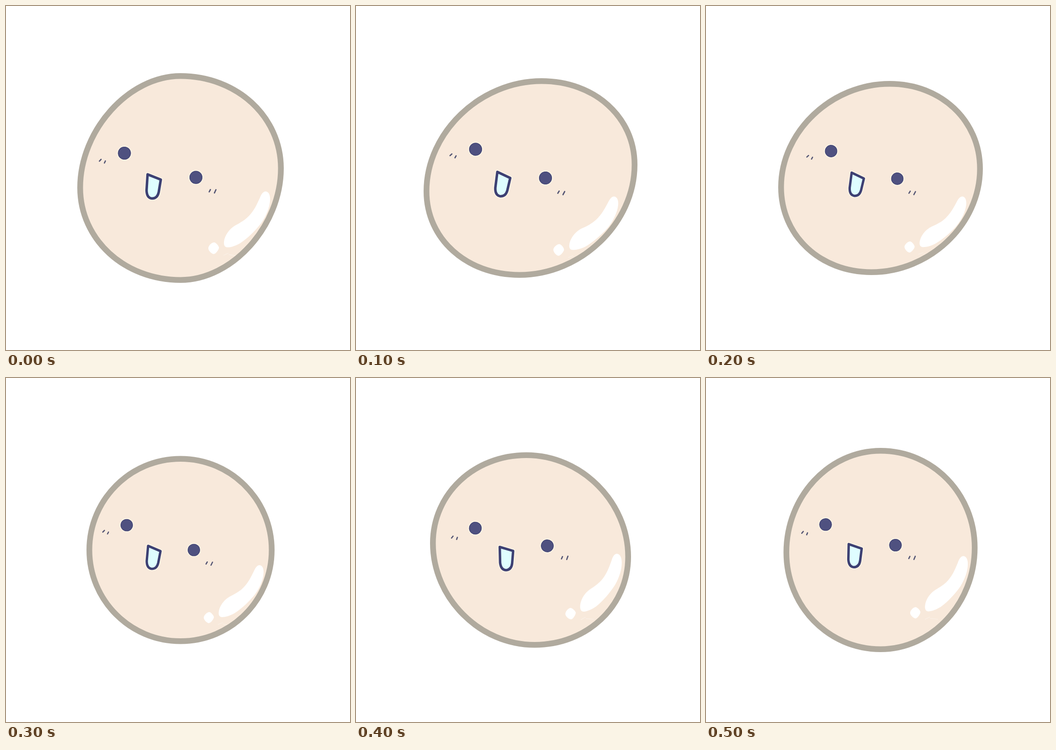
Write an HTML page that moves like this. It is 748 by 748 pixels and loops after 600 ms.

```html
<!DOCTYPE html>
<html lang="en">
<head>
<meta charset="utf-8">
<title>Wobbling ball</title>
<style>
  html, body { margin: 0; height: 100%; overflow: hidden; background: #fff; }
  svg { display: block; width: 100%; height: 100%; }
</style>
</head>
<body>
<svg viewBox="0 0 748 748" fill="none" stroke-linecap="round" stroke-linejoin="round">
  <path class="body" fill="#f8e9db"/>
  <g id="face">
    <path fill="#fff" d="M551 407C557 407 561 414 560 425C559 439 552 456 541 471C528 487 512 502 496 512C487 517 477 520 470 520C462 520 461 512 464 502C468 491 476 481 487 475C497 470 507 465 516 456C527 445 533 432 539 420C542 413 546 407 551 407Z"/>
    <path fill="#fff" d="M442 509C446 509 452 517 452 520C452 524 445 533 441 533C437 533 430 526 430 521C430 516 437 509 442 509Z"/>
    <path stroke="#fff" stroke-opacity=".4" d="M461 536L471 532M472 535L488 538"/>
    <g fill="#4f5180" stroke="#fdf3e4" stroke-width="2.5">
      <circle cx="262.5" cy="320" r="14.3"/>
      <circle cx="408.5" cy="374" r="14.3"/>
    </g>
    <g fill="#4f5180" stroke="#434676" stroke-width="1.5">
      <circle cx="262.5" cy="320" r="12.6"/>
      <circle cx="408.5" cy="374" r="12.6"/>
    </g>
    <path id="mouth" stroke="#fdf3e4" stroke-width="9"
      d="M309 365L336 376.5L331 402C329 411 324 415 317 415C309 414 306 408 306 398Z"/>
    <use href="#mouth"/>
    <path fill="#dffdff" stroke="#3d4073" stroke-width="5.2"
      d="M309 365L336 376.5L331 402C329 411 324 415 317 415C309 414 306 408 306 398Z"/>
    <path stroke="#555674" stroke-width="2.6"
      d="M210.5 335L214 331.5M220.8 339L222.8 335M435 404.5L437.6 400M445.8 407L449 400.5"/>
  </g>
  <path class="body" stroke="#b0aa9e" stroke-width="12.5"/>
</svg>
<script>
const STEP = 100, CX = 379.5, CY = 374, HALF_LINE = 6.25;
const REST = [262.5, 320, 408.5, 374];

// size: outer half width and height; lean: x shift of the top point, y shift of the right point;
// round: curvature of the top-right and top-left quarters; eyes: left x, y, right x, y
const poses = [
  { size: [224.5, 228], lean: [0, -21], round: [.56, .515], eyes: [257.5, 320, 413, 372.7] },
  { size: [232.5, 217], lean: [24, -29], round: [.57, .533], eyes: [260, 311.5, 412, 374] },
  { size: [222.5, 211], lean: [20, -20], round: [.568, .537], eyes: [272, 315.5, 416, 375.5] },
  { size: [204.5, 204.5], lean: [0, 0], round: [.552, .552], eyes: REST },
  { size: [218.5, 212.5], lean: [-9, 15], round: [.54, .56], eyes: [259.5, 326.5, 416, 365] },
  { size: [211, 222], lean: [0, -5], round: [.555, .548], eyes: [260, 318.7, 412, 363.5] }
];

function outline({ size, lean, round }) {
  const w = size[0] - HALF_LINE, h = size[1] - HALF_LINE, [dx, dy] = lean;
  const top = [CX + dx, CY - h], right = [CX + w, CY + dy];
  const bottom = [CX - dx, CY + h], left = [CX - w, CY - dy];
  const quarter = (a, b, corner, k) => {
    const toCorner = p => p.map((v, i) => v + (corner[i] - v) * k);
    return `C${toCorner(a)} ${toCorner(b)} ${b}`;
  };
  const [kr, kl] = round;
  return `M${top}` +
    quarter(top, right, [right[0], top[1]], kr) +
    quarter(right, bottom, [right[0], bottom[1]], kl) +
    quarter(bottom, left, [left[0], bottom[1]], kr) +
    quarter(left, top, [left[0], top[1]], kl) + "Z";
}

// Turn, scale and shift that carries the resting eyes onto the given ones
function faceMatrix([x, y, x2, y2]) {
  const [rx, ry, rx2, ry2] = REST;
  const u = rx2 - rx, v = ry2 - ry, p = x2 - x, q = y2 - y, n = u * u + v * v;
  const a = (p * u + q * v) / n, b = (q * u - p * v) / n;
  return `matrix(${[a, b, -b, a, x - a * rx + b * ry, y - b * rx - a * ry]})`;
}

const bodies = document.querySelectorAll(".body");
const face = document.getElementById("face");
const start = performance.now();

function draw(now) {
  const t = Math.max(0, now - start);
  const pose = poses[Math.floor(t / STEP) % poses.length];
  const d = outline(pose);
  bodies.forEach(el => el.setAttribute("d", d));
  face.setAttribute("transform", faceMatrix(pose.eyes));
  requestAnimationFrame(draw);
}
draw(start);
</script>
</body>
</html>
```
